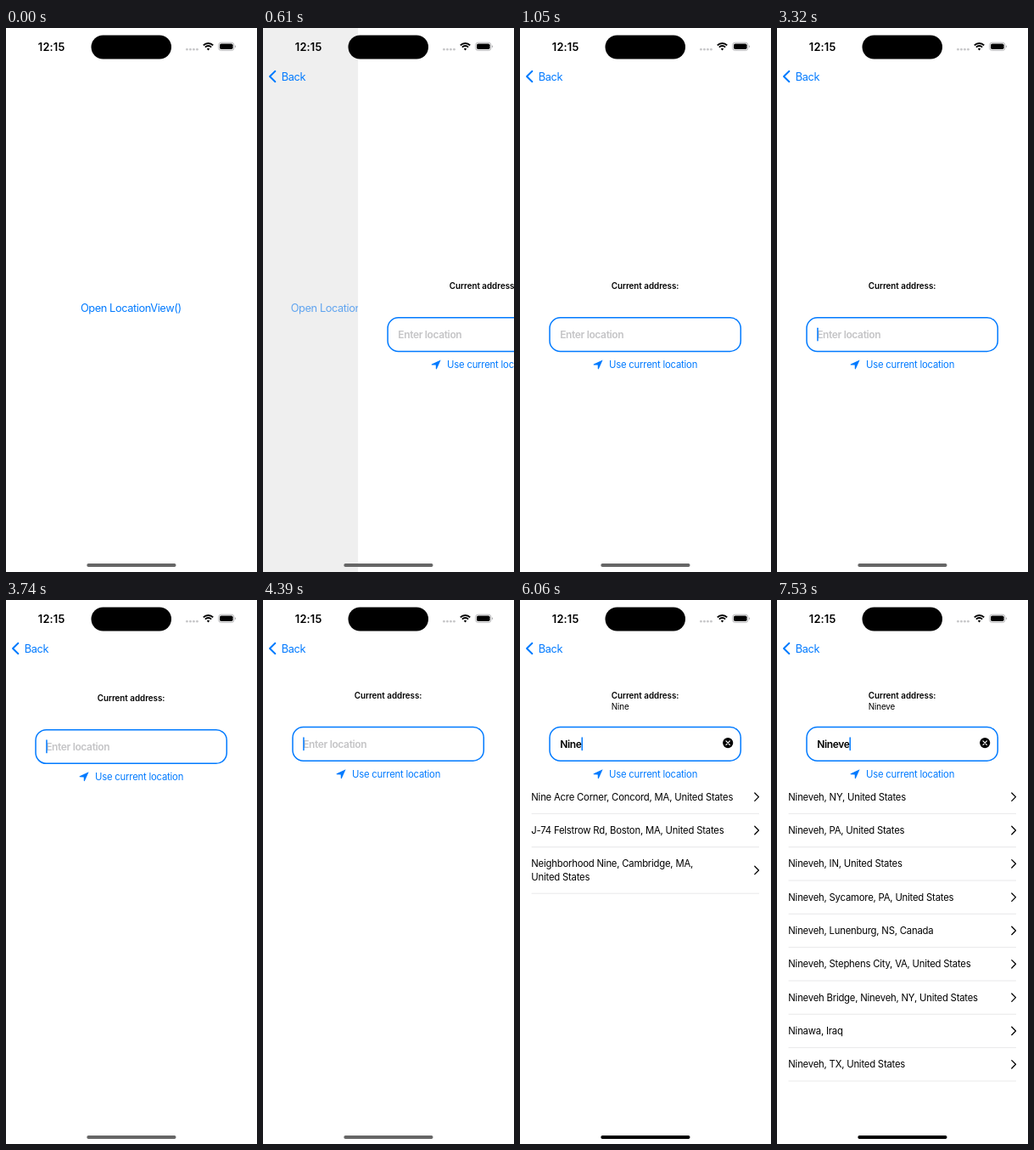
Recreate the animation shown at these times as an HTML page. Size 296x640 px, loop 8000 ms.

```html
<!DOCTYPE html>
<html lang="en">
<head>
<meta charset="utf-8">
<title>Location search</title>
<style>
  html, body { margin: 0; width: 100%; height: 100%; overflow: hidden; background: #fff; }
  svg { display: block; }
  text { font: 400 11.3px Inter, Roboto, sans-serif; letter-spacing: -.018em; }
  .link { fill: #007aff; }
  .large { font-size: 12.8px; letter-spacing: -.032em; }
  .clock { font-size: 12.8px; font-weight: 600; letter-spacing: .015em; }
  .label { font-size: 9.8px; font-weight: 600; letter-spacing: 0; }
  .value { font-size: 9.8px; letter-spacing: -.01em; }
  .input { font-size: 12px; font-weight: 600; letter-spacing: -.03em; }
  .line { fill: none; stroke-linecap: round; stroke-linejoin: round; }
</style>
</head>
<body>
<svg width="296" height="640" viewBox="0 0 296 640">
  <g id="home">
    <rect width="296" height="640" fill="#fff"/>
    <text id="open" class="link large" x="87.9" y="334">Open LocationView()</text>
  </g>
  <rect id="dim" width="296" height="640"/>

  <g id="page">
    <rect width="296" height="640" fill="#fff"/>
    <g id="form">
      <text class="label" x="107.7" y="306.9">Current address:</text>
      <text id="value" class="value" x="107.7" y="320.3"></text>
      <rect x="35" y="340.8" width="225.3" height="39.6" rx="12.5" fill="none" stroke="#007aff" stroke-width="1.5"/>
      <text class="input" id="placeholder" x="47.2" y="365.3" fill="#c4c4c6">Enter location</text>
      <text class="input" id="typed" x="47.2" y="365.3"></text>
      <rect id="cursor" y="352.5" width="1.5" height="16" rx=".7" fill="#007aff"/>
      <g id="clear">
        <circle cx="245.2" cy="359.3" r="6.1"/>
        <path class="line" stroke="#fff" stroke-width="1.2" d="M243 357.1l4.4 4.4m0-4.4l-4.4 4.4"/>
      </g>
      <path class="link" d="M97.6 390.5L86.8 395.4Q86.3 396.3 87 396.5L91.7 396.6L91.8 401Q92.3 401.8 92.9 401Z"/>
      <text class="link" x="105" y="400">Use current location</text>
    </g>
    <g id="list"></g>
  </g>

  <g id="back">
    <path class="line" stroke="#007aff" stroke-width="1.9" d="M14.4 50.8L8 57L14.4 63.2"/>
    <text class="link large" x="21.8" y="61.5">Back</text>
  </g>

  <text class="clock" x="37.8" y="26.6">12:15</text>
  <rect x="100.5" y="8.5" width="94.5" height="28" rx="14"/>
  <g fill="#c8c8ca">
    <circle cx="213.4" cy="25.2" r="1.4"/><circle cx="217.4" cy="25.2" r="1.4"/>
    <circle cx="221.4" cy="25.2" r="1.4"/><circle cx="225.4" cy="25.2" r="1.4"/>
  </g>
  <path fill="none" stroke="#000" stroke-width="1.9" d="M232.8 20.4A8 8 0 0 1 244.2 20.4M234.9 22.6A5 5 0 0 1 242.1 22.6"/>
  <path d="M236.8 24.6A2.4 2.4 0 0 1 240.2 24.6L238.5 26.5Z"/>
  <rect x="250.7" y="17.2" width="18.2" height="9.2" rx="2.9" fill="none" stroke="#a4a4a6" stroke-width=".8"/>
  <rect x="252" y="18.5" width="15.6" height="6.6" rx="1.8"/>
  <path fill="#a4a4a6" d="M270 20.3Q272 21.8 270 23.3Z"/>
  <rect id="homeBar" x="95.3" y="630.1" width="105.2" height="3.9" rx="1.95"/>
</svg>

<script>
const LOOP = 8000, WIDTH = 296, LIFT = 191.2;
const ROW_TOP = 212, ROW_HEIGHT = 39.33, LINE_HEIGHT = 15.2;

// Moments at which the picture is refreshed; it holds in between.
const ticks = [0, 500, 610, 730, 840, 940, 1050, 3320, 3540, 3650, 3740, 3920, 4030,
  4270, 4390, 4900, 5100, 5220, 5450, 5570, 5920, 6060, 6550, 7060, 7390, 7530];

const typing = [[0, ""], [4900, "N"], [5100, "Ni"], [5450, "Nin"], [5920, "Nine"],
  [6550, "Ninev"], [7390, "Nineve"]];

const us = place => place + ", United States";
const [ny, pa, indiana, sycamore, stephens, bridge, tx] = [
  "Nineveh, NY", "Nineveh, PA", "Nineveh, IN", "Nineveh, Sycamore, PA",
  "Nineveh, Stephens City, VA", "Nineveh Bridge, Nineveh, NY", "Nineveh, TX"].map(us);
const lunenburg = "Nineveh, Lunenburg, NS, Canada", iraq = "Ninawa, Iraq";

const results = [
  [0, []],
  [5220, [us("Niagara Falls, NY"), us("Niles, IL"), "Nice, France", us("Niantic, CT")]],
  [5570, [us("Ninety Six, SC"), "Ningbo, Zhejiang, China", us("Ninilchik, AK"), us("Ninnekah, OK")]],
  [6060, [us("Nine Acre Corner, Concord, MA"), us("J-74 Felstrow Rd, Boston, MA"),
    "Neighborhood Nine, Cambridge, MA,\nUnited States"]],
  [7060, [ny, pa, indiana, lunenburg, stephens, bridge, sycamore, tx, iraq]],
  [7530, [ny, pa, indiana, sycamore, lunenburg, stephens, bridge, iraq, tx]]
];

const $ = id => document.getElementById(id);
const latest = (track, t) => track.filter(([at]) => at <= t).pop()[1];
const show = (id, opacity) => $(id).setAttribute("opacity", +opacity);
const move = (id, x, y) => $(id).setAttribute("transform", `translate(${x} ${y})`);

// Critically damped spring from 0 to 1.
function spring(t, start, speed) {
  const u = Math.max(0, t - start) / 1000 * speed;
  return 1 - (1 + u) * Math.exp(-u);
}

function listMarkup(rows) {
  let top = ROW_TOP;
  return rows.map(row => {
    const lines = row.split("\n");
    const height = ROW_HEIGHT + (lines.length - 1) * LINE_HEIGHT;
    const middle = top + height / 2;
    const firstLine = middle + 4.1 - (lines.length - 1) * LINE_HEIGHT / 2;
    top += height;
    return lines.map((line, i) =>
        `<text x="13.3" y="${firstLine + i * LINE_HEIGHT}">${line}</text>`).join("") +
      `<path class="line" stroke="#000" stroke-width="1.3" d="M276.8 ${middle - 4.7}l4.7 4.7l-4.7 4.7"/>` +
      `<path stroke="#e2e2e4" stroke-width=".8" d="M13.6 ${top}H282"/>`;
  }).join("");
}

function draw(t) {
  const push = t >= 1050 ? 1 : spring(t, 476, 15.7);
  const lift = t >= 4030 ? 1 : spring(t, 3450, 21);
  const text = latest(typing, t);

  move("home", -0.3 * WIDTH * push, 0);
  show("open", t < 500 ? 1 : .6);
  show("dim", .1 * push);
  move("page", WIDTH * (1 - push), 0);
  show("back", Math.min(1, 2 * push));
  move("form", 0, -LIFT * lift);

  $("value").textContent = $("typed").textContent = text;
  show("placeholder", !text);
  show("clear", text !== "");
  $("cursor").setAttribute("x", 47.2 + (text ? $("typed").getComputedTextLength() : 0));
  show("cursor", t >= 3320 && !(t >= 4270 && t < 4390));
  $("homeBar").setAttribute("fill", t < 4900 ? "#666" : "#000");
  $("list").innerHTML = listMarkup(latest(results, t));
}

let shown = -1;
function frame() {
  const now = performance.now() % LOOP;
  const tick = ticks.filter(at => at <= now).pop();
  if (tick !== shown) draw(shown = tick);
  requestAnimationFrame(frame);
}
frame();
</script>
</body>
</html>
```
